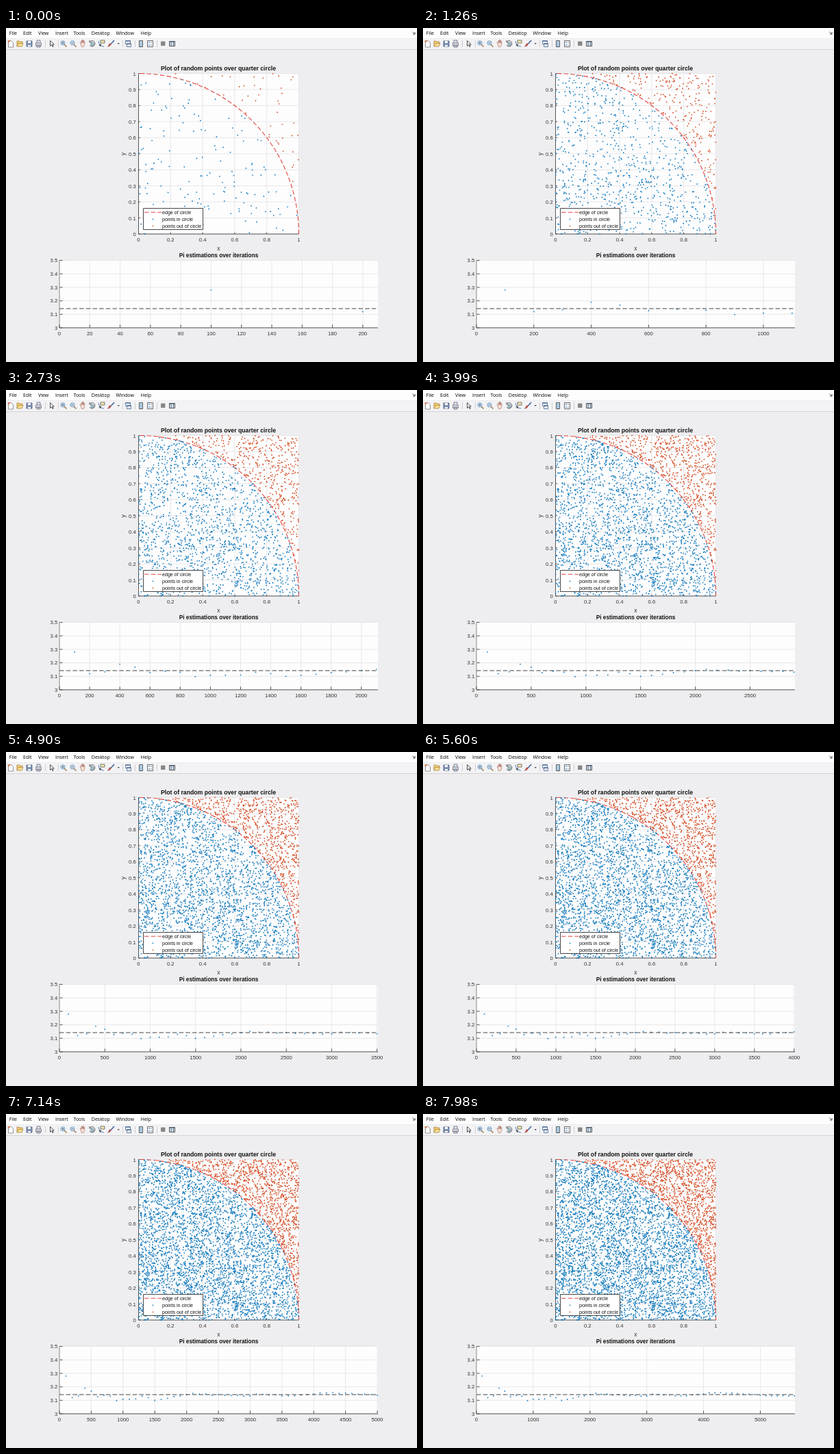
An HTML page that plays this animation: 600 by 488 pixels, repeating every 8 s.

```html
<!DOCTYPE html>
<html lang="en">
<head>
<meta charset="utf-8">
<title>Pi estimation</title>
<style>
  html, body { margin: 0; width: 100%; height: 100%; overflow: hidden; background: #eeeef0; }
  svg { display: block; width: 600px; height: 488px; }
  text { font-family: "Liberation Sans", Arial, sans-serif; font-size: 7.7px; fill: #333; }
  .menu text { font: 7px "Open Sans", sans-serif; fill: #000; }
  .title { font-weight: bold; fill: #111; text-anchor: middle; }
  .legend text { font-size: 7.1px; fill: #111; }
  .mid { text-anchor: middle; }
  .end { text-anchor: end; }
  .grid { stroke: #e2e2e5; stroke-width: .8; fill: none; }
  .axis { stroke: #444; stroke-width: .9; fill: none; }
  .dots { fill: none; stroke-width: 1.85; stroke-linecap: round; }
  .in { stroke: #1a7fbf; }
  .out { stroke: #d6532b; }
  .edge { fill: none; stroke: #e2453f; stroke-width: 1.1; stroke-dasharray: 6.5 3.2; }
  .icons { fill: none; stroke: #444; stroke-width: .9; opacity: .88; }
</style>
</head>
<body>
<svg viewBox="0 0 600 488">
  <rect width="600" height="488" fill="#eeeef0"/>
  <rect width="600" height="15" fill="#fdfdfe"/>
  <rect y="15" width="600" height="16" fill="#f3f3f5"/>
  <path d="M0 15.5H600" stroke="#ececef"/>
  <path d="M0 31.5H600" stroke="#d2d2d6"/>
  <g class="menu">
    <text x="4.8" y="10">File</text><text x="25" y="10">Edit</text>
    <text x="47" y="10">View</text><text x="72" y="10">Insert</text>
    <text x="98.5" y="10">Tools</text><text x="124.8" y="10">Desktop</text>
    <text x="160.5" y="10">Window</text><text x="196.8" y="10">Help</text>
  </g>
  <g class="icons">
    <path d="M593.5 5.5l3 3M597 6v3h-3" stroke="#222"/>
    <path d="M57.5 18v10M76.5 18v10M170.5 18v10M188.5 18v10M220.5 18v10" stroke="#c8c8cc"/>
    <path d="M3.5 18.5h4l3 3v6.5h-7z" fill="#fff" stroke="#777"/>
    <circle cx="4" cy="19.5" r="1.6" fill="#e0703c" stroke="none"/>
    <path d="M16 27v-8h3l1 1h4v2" fill="#f3c65a" stroke="#a8843a"/>
    <path d="M16 27l2-4.5h7l-2 4.5z" fill="#fbdc84" stroke="#a8843a"/>
    <path d="M30 19h8v8h-8z" fill="#6d84ac" stroke="#44557c"/>
    <path d="M32 19h4v3h-4zM32 25h4v2h-4z" fill="#fff" stroke="none"/>
    <path d="M45 22v-4h5v4M43.5 22h8v4h-8zM45 25h5v3h-5z" fill="#dde3ec" stroke="#667"/>
    <path d="M64.5 18.5v8l2-2 1.5 3 1.2-.6-1.5-2.9h2.6z" fill="#fff" stroke="#222"/>
    <g id="lenses"></g>
    <path d="M109 23l-1-2 1-.5 1 1.5v-3.5h1.2v3-4h1.2v4-3.5h1.2v4-2.5h1.2v4.5l-1.5 3.5h-3z" fill="#f6dfd2" stroke="#a5685c" stroke-width=".7"/>
    <path d="M122.5 20a4.2 4.2 0 1 1-.5 5M122 18v3h3" stroke="#333"/>
    <path d="M124 22l2-1 2 1v3l-2 1-2-1z" fill="#9bb8dd" stroke="#587"/>
    <path d="M135 19q1 8 8 8" stroke="#2b62b0"/>
    <path d="M138 18h6v4h-6z" fill="#f7e8a0" stroke="#555"/>
    <path d="M137.5 23v4M135.5 25h4" stroke="#222"/>
    <path d="M158 18l-4.5 5" stroke="#345b9c" stroke-width="1.8"/>
    <path d="M153.5 23q-1 4-5 4 2-1 2.5-4z" fill="#c44b36" stroke="#933"/>
    <path d="M162.5 22h3.4l-1.7 2z" fill="#333" stroke="none"/>
    <path d="M174.5 18.5h7v5h-7zM176.5 22.5h6v5h-6z" fill="#e8eef6" stroke="#47648e"/>
    <path d="M174.5 19h7" stroke="#47648e" stroke-width="1.5"/>
    <path d="M194.5 18.5h5v9h-5z" fill="#bcd9ee" stroke="#333"/>
    <path d="M196 21h2M196 23.5h2M196 26h2" stroke="#3b7dbd"/>
    <path d="M206.5 18.5h8v9h-8z" fill="#fff" stroke="#444"/>
    <path d="M208 21h2M208 25h2" stroke="#3b7dbd" stroke-width="1.5"/>
    <path d="M211 21h2M211 25h2" stroke="#456"/>
    <path d="M226.5 20h5.5v5.5h-5.5z" fill="#777" stroke="#777"/>
    <path d="M238.5 19.5h8v7h-8z" fill="#d5e4f2" stroke="#333"/>
    <path d="M238 20h9M241 20v6M244.5 20v6" stroke="#345"/>
  </g>

  <rect x="193.5" y="66.5" width="234" height="234.5" fill="#fdfdfe"/>
  <rect x="78" y="339.5" width="465" height="98.5" fill="#fdfdfe"/>
  <g id="fixed"></g>
  <g id="ticks"></g>
  <path class="edge" d="M427.5 301A234 234.5 0 0 0 193.5 66.5"/>
  <path class="dots in" id="inside"/>
  <path class="dots out" id="outside"/>
  <path class="dots in" id="estimates"/>
  <path d="M78 410H543" stroke="#444" stroke-width="1.1" stroke-dasharray="6.5 3.2"/>

  <text class="title" x="310" y="62" style="font-size:8.7px">Plot of random points over quarter circle</text>
  <text class="title" x="310.5" y="335" style="font-size:8.3px">Pi estimations over iterations</text>
  <text class="mid" x="310.3" y="324.5" style="font-size:8.5px">x</text>
  <text class="mid" transform="translate(174 184)rotate(-90)" style="font-size:8.5px">y</text>

  <g class="legend">
    <path d="M200.5 263.5h87v31h-87z" fill="#fff" stroke="#333" stroke-width=".9"/>
    <path class="edge" d="M202 269.3h25"/>
    <path class="dots in" d="M214.5 279.3h.01"/>
    <path class="dots out" d="M214.5 289.3h.01"/>
    <text x="228" y="272">edge of circle</text>
    <text x="228" y="282">points in circle</text>
    <text x="228" y="292">points out of circle</text>
  </g>
</svg>
<script>
const LOOP = 8000, STEP = 70, BATCH_MS = 148, SIZE = 100;
// Estimate after each batch of 100 points, in thousandths above 3
const estimates = [
  280, 120, 133, 190, 168, 127, 137, 130, 98, 108, 108, 110, 130, 120, 99, 107, 115, 127, 133,
  142, 152, 145, 146, 138, 142, 137, 135, 137, 131, 132, 145, 144, 140, 140, 133, 133, 133, 140,
  143, 148, 155, 155, 157, 152, 154, 150, 145, 145, 143, 138, 133, 133, 132, 135, 132, 133];

const $ = id => document.getElementById(id);
const line = (cls, d) => `<path class="${cls}" d="${d}"/>`;
const label = (cls, x, y, s) => `<text class="${cls}" x="${x}" y="${y}">${s}</text>`;
const dot = (x, y) => `M${x.toFixed(1)} ${y.toFixed(1)}h.01`;

let seed = 271828183;
const random = () => (seed = seed * 48271 % 2147483647) / 2147483647;

// Each batch holds as many inside points as its estimate implies
let hits = 0;
const batches = estimates.map((e, i) => {
  const total = Math.round((3 + e / 1000) / 4 * SIZE * (i + 1));
  const left = [SIZE - total + hits, total - hits];
  const paths = ['', ''];
  hits = total;
  while (left[0] > 0 || left[1] > 0) {
    const x = random(), y = random(), inside = +(x * x + y * y <= 1);
    if (left[inside]-- > 0) paths[inside] += dot(193.5 + 234 * x, 301 - 234.5 * y);
  }
  return paths;
});

function drawFixed() {
  let grid = '', axis = 'M193.5 66.5V301H427.5M78 339.5V438H543', text = '';
  for (let i = 0; i <= 10; i++) {
    const y = 301 - 23.45 * i, x = 193.5 + 23.4 * i;
    grid += `M193.5 ${y}h234`;
    axis += `M193.5 ${y}h2.4`;
    text += label('end', 189.7, y + 3, i / 10);
    if (i % 2) continue;
    grid += `M${x} 66.5v234.5`;
    axis += `M${x} 301v-2.4`;
    text += label('mid', x, 312.4, i / 10);
  }
  for (let i = 0; i <= 5; i++) {
    const y = 438 - 19.7 * i;
    grid += `M78 ${y}h465`;
    axis += `M78 ${y}h4.6`;
    text += label('end', 75.3, y + 2.8, 3 + i / 10);
  }
  $('fixed').innerHTML = line('grid', grid) + line('axis', axis) + text;
  $('lenses').innerHTML = [84, 98].map((x, i) =>
    `<path d="M${x + 1} 24l3.5 3.5" stroke="#a0703c" stroke-width="1.6"/>` +
    `<circle cx="${x - 1}" cy="21.8" r="3" fill="#d8ecfa" stroke="#4a7db0"/>` +
    `<path d="M${x - 2.5} 21.8h3${i ? '' : 'm-1.5-1.5v3'}" stroke="#234"/>`).join('');
}

function tickStep(limit) {
  for (let p = 10; ; p *= 10)
    for (const m of [1, 2, 5]) if (limit / (m * p) <= 11) return m * p;
}

function draw(count) {
  const limit = count * SIZE + 10, gap = tickStep(limit);
  const toX = n => 78 + 465 * n / limit;
  let grid = '', axis = '', text = '';
  for (let n = 0; n <= limit; n += gap) {
    grid += `M${toX(n)} 339.5v98.5`;
    axis += `M${toX(n)} 438v-4.6`;
    text += label('mid', toX(n), 448.8, n);
  }
  $('ticks').innerHTML = line('grid', grid) + line('axis', axis) + text;
  const shown = batches.slice(0, count);
  $('outside').setAttribute('d', shown.map(b => b[0]).join(''));
  $('inside').setAttribute('d', shown.map(b => b[1]).join(''));
  $('estimates').setAttribute('d', estimates.slice(0, count)
    .map((e, i) => dot(toX((i + 1) * SIZE), 438 - e * .197)).join(''));
}

let current = 0;
function tick() {
  const t = performance.now() % LOOP;
  const count = 2 + Math.floor(Math.floor(t / STEP) * STEP / BATCH_MS + .6);
  if (count !== current) draw(current = count);
  requestAnimationFrame(tick);
}
drawFixed();
tick();
</script>
</body>
</html>
```
